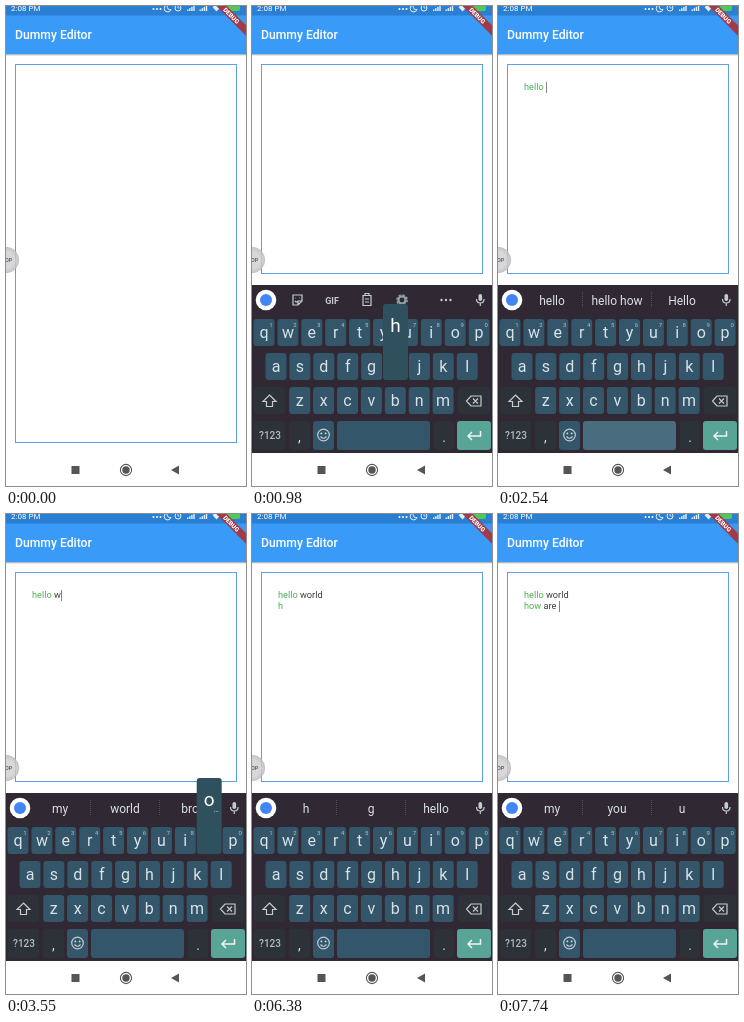
An HTML page that plays this animation: 240x480 px, repeating every 8 s.

```html
<!DOCTYPE html>
<html lang="en">
<head>
<meta charset="utf-8">
<title>Dummy Editor</title>
<style>
  html, body { margin: 0; width: 100%; height: 100%; overflow: hidden; background: #fff; }
  svg { display: block; width: 240px; height: 480px; }
  text { font-family: Roboto, "Open Sans", sans-serif; white-space: pre; }
  .mid { text-anchor: middle; }
  .line { fill: none; stroke: #c4ccd2; stroke-width: 1.2; }
</style>
</head>
<body>
<svg id="stage" viewBox="0 0 240 480"></svg>
<script>
const LOOP = 8000;
const BG = '#302833', KEY = '#33566a', DIM = '#2c3238', POP = '#2f505d', INK = '#dbe2e6';
const DARK = '#3b3b3b', GREEN = '#4caf50', SIZE = 9.2;

const rect = (x, y, w, h, fill, r = 0, more = '') =>
  `<rect x="${x}" y="${y}" width="${w}" height="${h}" rx="${r}" fill="${fill}" ${more}/>`;
const circle = (x, y, r, fill, more = '') =>
  `<circle cx="${x}" cy="${y}" r="${r}" fill="${fill}" ${more}/>`;
const label = (x, y, size, fill, str, more = 'class="mid"') =>
  `<text x="${x}" y="${y}" font-size="${size}" fill="${fill}" ${more}>${str}</text>`;
const path = (d, more = 'class="line"') => `<path d="${d}" ${more}/>`;

// Letter keys
const rows = [
  { keys: 'qwertyuiop', x: 12, y: 313 },
  { keys: 'asdfghjkl', x: 24, y: 347 },
  { keys: 'zxcvbnm', x: 47.7, y: 381 }
];
const keys = {};
for (const row of rows) {
  [...row.keys].forEach((k, i) => keys[k] = { x: row.x + i * 23.9, y: row.y });
}

function letterKeys() {
  let out = '';
  for (const [k, p] of Object.entries(keys)) {
    out += rect(p.x - 10.5, p.y, 21, 27, KEY, 3) + label(p.x, p.y + 19, 16, INK, k);
  }
  [...'1234567890'].forEach((n, i) => out += label(19 + i * 23.9, 320.5, 6, '#b9c4ca', n));
  return out;
}

function toolbar() {
  const dots = [189.5, 194, 198.5].map(x => circle(x, 294, 1.2, '#c4ccd2')).join('');
  return path('M41 289h9v6l-4 4h-5zM50 295h-4v4M43.500 292h.5M47 292h.5M43 295q2 2 3 0')
    + label(80, 297.5, 9, '#c4ccd2', 'GIF', 'class="mid" font-weight="700"')
    + path('M111 289.500h8v10h-8zM113 289v-1.500h4v1.500M113 293h4M113 296h4')
    + circle(150, 294, 3.6, 'none', 'stroke="#8fa0a6" stroke-width="2.4"')
    + circle(150, 294, 5.2, 'none', 'stroke="#8fa0a6" stroke-width="1.4" stroke-dasharray="2.200 1.890"')
    + dots;
}

function keyboard() {
  const words = [54, 119, 184].map(x => label(x, 298.5, 12, INK, '', 'class="mid word"')).join('');
  const bars = [84.5, 153.5].map(x => path(`M${x} 286v16`, 'stroke="#55505c" stroke-dasharray="1 1"')).join('');
  return rect(0, 279, 240, 168, BG)
    + circle(14, 294, 10.3, '#fff') + circle(14, 294, 6, '#4285f4')
    + `<g id="tools">${toolbar()}</g><g id="words">${bars}${words}</g>`
    + rect(226.5, 288, 3.6, 7, '#c4ccd2', 1.8) + path('M224.500 293q0 4 3.800 4t3.800 -4M228.300 297v3')
    + letterKeys()
    + rect(2, 381, 31, 27, DIM, 3) + path('M17.500 389l6.500 6.500h-3.500v5h-6v-5h-3.500z')
    + rect(206, 381, 32, 27, DIM, 3) + path('M219 390h10v10h-10l-4.500 -5zM221 392.500l5 5M226 392.500l-5 5')
    + rect(2, 415, 31, 29, DIM, 3) + label(18, 433, 10, '#b3bdc2', '?123', 'class="mid" font-weight="500"')
    + rect(37, 415, 21, 29, DIM, 3) + label(47.5, 436, 14, INK, ',')
    + rect(61, 415, 21, 29, KEY, 3) + circle(71.5, 429, 5.8, 'none', 'class="line"')
    + circle(69.4, 427.4, 0.9, INK) + circle(73.600, 427.4, 0.9, INK) + path('M68.500 430.500q3 3.500 6 0')
    + rect(85, 415, 93, 29, KEY, 3, 'id="space"')
    + rect(182, 415, 20, 29, DIM, 3) + label(192, 436, 14, INK, '.')
    + rect(205, 415, 34, 29, '#58a497', 3, 'id="enter"')
    + path('M228.500 425v5h-12M220 426l-4 4 4 4', 'fill="none" stroke="#eef5f4" stroke-width="1.500"')
    + `<g id="pop">${rect(-12.5, -49, 25, 76, POP, 3)}${label(0, -21.5, 19, '#fff', '', 'class="mid" id="popKey"')}`
    + label(7, -15, 8, '#dfe6e9', '…', 'class="mid" id="more"') + '</g>';
}

function statusBar() {
  const bars = x => [0, 1, 2, 3].map(i => rect(x + i * 2.1, 3.5 - i * 1.3, 1.4, 1.5 + i * 1.3, '#e4f0fc')).join('');
  return rect(0, 0, 240, 9.5, '#2b7fd3')
    + label(5, 5, 8, '#fff', '2:08 PM', '')
    + [147.5, 151, 154.5].map(x => circle(x, 3, 1, '#fff')).join('')
    + path('M161 -1a3.500 3.500 0 1 0 4 4.500q-4 1 -4 -4.500', 'fill="none" stroke="#e4f0fc"')
    + circle(172, 2, 3, 'none', 'stroke="#e4f0fc"') + path('M172 0v2h1.500', 'fill="none" stroke="#e4f0fc" stroke-width=".8"')
    + bars(181) + bars(193.500)
    + path('M206.500 1q4 -3 8 0l-4 4.500z', 'fill="#e4f0fc"')
    + rect(219, -2, 15, 7, '#52c957', 2)
    + `<g transform="translate(225.300 9.700) rotate(45)">${rect(-25, -3.7, 50, 7.4, '#a23a48')}`
    + label(0, 2.2, 6.2, '#fff', 'DEBUG', 'class="mid" font-weight="900"') + '</g>';
}

function navBar() {
  return rect(0, 447, 240, 33, '#fff')
    + rect(65.5, 460, 8, 8, '#555')
    + circle(120, 464, 5.6, 'none', 'stroke="#555" stroke-width="1.100"') + circle(120, 464, 3.7, '#555')
    + path('M173 459.500v9l-8 -4.500z', 'fill="#555"');
}

document.getElementById('stage').innerHTML =
  rect(0, 0, 240, 480, '#fff')
  + rect(0, 48, 240, 1, '#b5bcc4') + rect(0, 49, 240, 1, '#e6e8ea')
  + rect(0, 0, 240, 48, '#3a9af7') + statusBar()
  + label(9, 33, 12.2, '#fff', 'Dummy Editor', 'font-weight="500"')
  + rect(9.5, 58.5, 221, 378, 'none', 0, 'id="field" stroke="#5a9fe9"')
  + [84, 95].map(y => `<text class="row" x="26" y="${y}" font-size="${SIZE}"><tspan fill="${GREEN}"></tspan><tspan fill="${DARK}"></tspan></text>`).join('')
  + rect(0, 76, 1, 11, '#858585', 0, 'id="caret"')
  + `<g id="board">${keyboard()}</g>`
  + circle(0, 254, 12.7, '#c6c6c8', 'fill-opacity=".85" stroke="#b4b4b6" stroke-width=".7"')
  + circle(0, 254, 9.500, '#d9d7da') + label(-1, 256, 5.5, '#555', 'OP', 'font-weight="500"')
  + navBar();

// Each step changes part of the state; "text" lines, "pop" pressed letter, "sug" suggestions.
const steps = [
  [0, { kb: 0, text: '', caret: 0, sug: '', pop: '', hold: '' }],
  [210, { kb: 0.5, caret: 1 }],
  [310, { kb: 1 }],
  [670, { caret: 0 }],
  [980, { pop: 'h' }],
  [1060, { text: 'h', caret: 1 }],
  [1140, { pop: '', sug: 'h,g,hello' }],
  [1220, { pop: 'e' }],
  [1290, { text: 'he' }],
  [1370, { pop: '' }],
  [1530, { sug: 'he,hello,hey' }],
  [1710, { pop: 'l' }],
  [1790, { text: 'hel' }],
  [1870, { pop: '', caret: 0 }],
  [1960, { pop: 'l', sug: 'hel,hello,help' }],
  [2040, { text: 'hell', caret: 1 }],
  [2100, { pop: 'o', sug: 'hell,hello,he' }],
  [2160, { text: 'hello' }],
  [2240, { pop: '', sug: 'hello,hello how,Hello' }],
  [2400, { hold: 'space' }],
  [2490, { text: 'hello ' }],
  [2580, { hold: '' }],
  [2670, { sug: 'my,world,bro' }],
  [3140, { caret: 0 }],
  [3440, { pop: 'w' }],
  [3500, { text: 'hello w', caret: 1 }],
  [3550, { pop: 'o' }],
  [3650, { text: 'hello wo' }],
  [3730, { pop: '' }],
  [3820, { sug: 'w,with,world' }],
  [4000, { sug: 'wo,world,would' }],
  [4180, { pop: 'r' }],
  [4280, { text: 'hello wor' }],
  [4380, { pop: '', sug: 'work,world,word' }],
  [4530, { pop: 'd', text: 'hello worl' }],
  [4860, { pop: '', text: 'hello world', sug: 'world,world how,World' }],
  [5020, { caret: 0 }],
  [5430, { hold: 'enter' }],
  [5500, { text: 'hello world\n', caret: 1 }],
  [5570, { hold: '' }],
  [5700, { sug: 'I,the,hello' }],
  [6080, { pop: 'h' }],
  [6160, { text: 'hello world\nh' }],
  [6240, { pop: '' }],
  [6380, { sug: 'h,g,hello', caret: 0 }],
  [6460, { pop: 'o' }],
  [6510, { text: 'hello world\nho', caret: 1 }],
  [6560, { pop: '', sug: 'ho,how,hot' }],
  [6720, { text: 'hello world\nhow', sug: 'how,how are,How' }],
  [6800, { hold: 'space' }],
  [6890, { text: 'hello world\nhow ', hold: '' }],
  [6980, { sug: 'are,is,to' }],
  [7130, { text: 'hello world\nhow a' }],
  [7210, { pop: 'r' }],
  [7290, { text: 'hello world\nhow ar' }],
  [7370, { pop: 'e' }],
  [7450, { text: 'hello world\nhow are' }],
  [7530, { pop: '', sug: 'are,are you,Are' }],
  [7600, { hold: 'space' }],
  [7670, { text: 'hello world\nhow are ', hold: '' }],
  [7740, { sug: 'my,you,u' }]
];

const $ = id => document.getElementById(id);
const set = (el, name, value) => el.setAttribute(name, value);
const show = (el, on) => set(el, 'visibility', on ? 'visible' : 'hidden');
const lineEls = document.querySelectorAll('.row');
const wordEls = document.querySelectorAll('.word');
const pen = document.createElement('canvas').getContext('2d');
pen.font = `${SIZE}px Roboto, "Open Sans", sans-serif`;

function drawText(text, caret) {
  const lines = text.split('\n');
  lineEls.forEach((el, i) => {
    const str = lines[i] || '';
    const first = str.split(' ')[0];
    const lit = i > 0 || str.startsWith('hello ') ? first.length : 0;
    el.children[0].textContent = str.slice(0, lit);
    el.children[1].textContent = str.slice(lit);
  });
  const last = lines.length - 1;
  set($('caret'), 'x', Math.round(26 + pen.measureText(lines[last]).width));
  set($('caret'), 'y', 76 + 11 * last);
  show($('caret'), caret);
}

function draw(s) {
  set($('board'), 'transform', `translate(0 ${168 * (1 - s.kb)})`);
  set($('field'), 'height', s.kb ? 209 : 378);
  drawText(s.text, s.caret);
  show($('tools'), !s.sug);
  show($('words'), s.sug);
  const words = s.sug.split(',');
  wordEls.forEach((el, i) => el.textContent = words[i] || '');
  show($('pop'), s.pop);
  show($('more'), s.pop === 'o');
  if (s.pop) {
    const k = keys[s.pop];
    set($('pop'), 'transform', `translate(${k.x} ${k.y})`);
    $('popKey').textContent = s.pop;
  }
  if (s.pop !== 'o') set($('more'), 'visibility', 'hidden');
  else set($('more'), 'visibility', 'inherit');
  set($('space'), 'fill', s.hold === 'space' ? '#4a6c7f' : KEY);
  set($('enter'), 'fill', s.hold === 'enter' ? '#7bbdb2' : '#58a497');
}

let shown = -1;
function tick() {
  const t = performance.now() % LOOP;
  const n = steps.filter(step => step[0] <= t).length;
  if (n !== shown) {
    shown = n;
    draw(Object.assign({}, ...steps.slice(0, n).map(step => step[1])));
  }
  requestAnimationFrame(tick);
}
tick();
</script>
</body>
</html>
```
